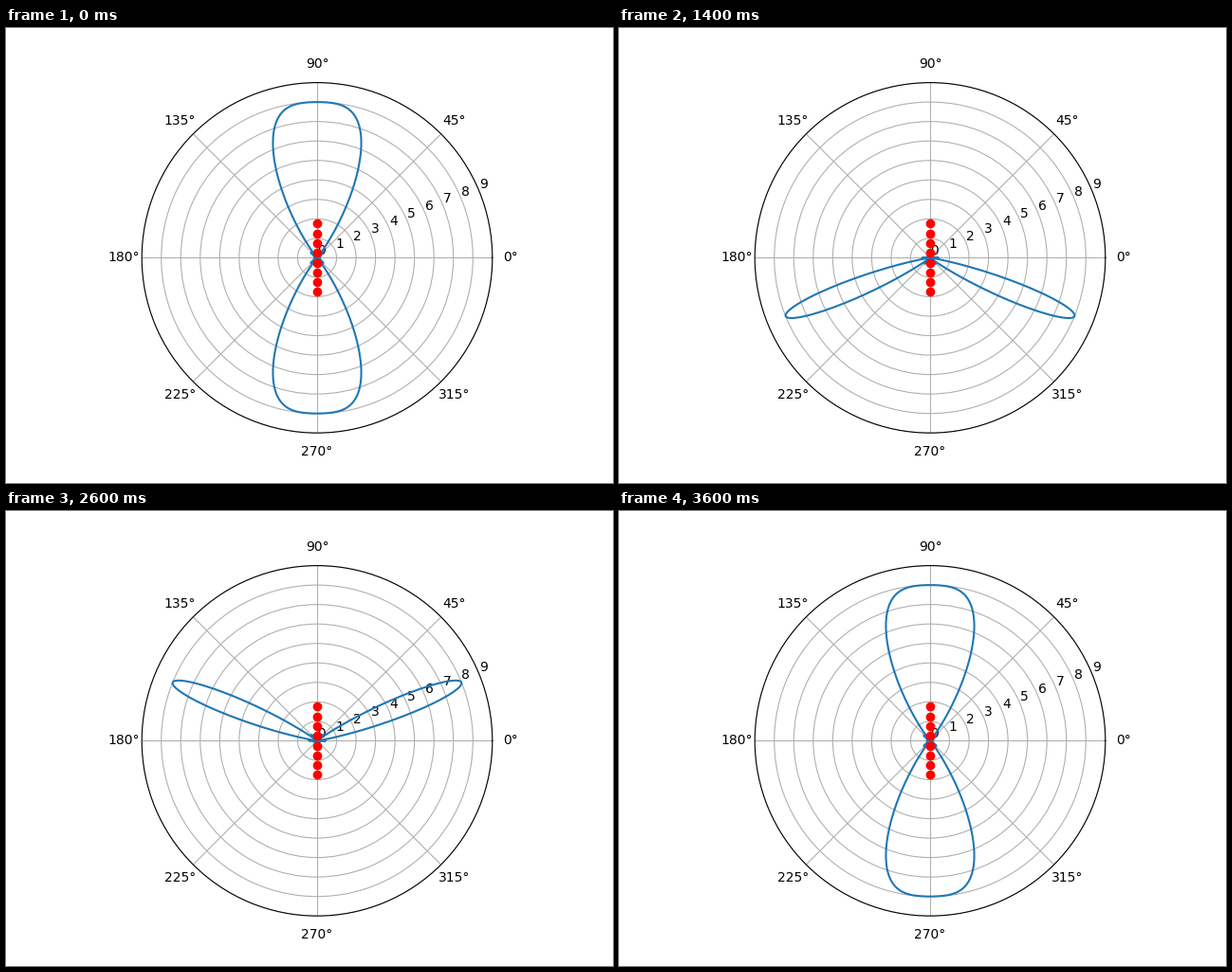
Recreate the animation shown at these times as a matplotlib script. Size 640 by 480 pixels, loop 3800 ms.

```python
import numpy as np
import matplotlib.pyplot as plt
from matplotlib.animation import FuncAnimation

N = 8               # array elements
SPACING = 0.5       # in wavelengths
STEPS = 16          # steering steps from -90 to +90 degrees
HOLD = 2            # extra frames on the first pose
FRAMES = STEPS + 1 + HOLD

theta = np.linspace(0, 2 * np.pi, 1000)
index = np.arange(N)


def pattern(steer):
    """Radiated power for a beam steered to sin(angle) = steer."""
    phase = 2 * np.pi * SPACING * (np.sin(theta) - steer)
    field = np.exp(1j * np.outer(phase, index)).sum(axis=1)
    return np.abs(field) ** 2 / N


fig = plt.figure(figsize=(6.4, 4.8), dpi=100)
ax = fig.add_subplot(projection="polar")

beam, = ax.plot(theta, pattern(-1))
pos = (index - (N - 1) / 2) * SPACING
ax.plot(np.sign(pos) * np.pi / 2, np.abs(pos), "ro")

ax.set_ylim(0, 9)
ax.set_yticks(range(10))


def update(i):
    step = max(0, i - HOLD)
    beam.set_ydata(pattern(2 * step / STEPS - 1))
    return beam,


anim = FuncAnimation(fig, update, frames=FRAMES, interval=200,
                     repeat=True, repeat_delay=0)
plt.show()
```
